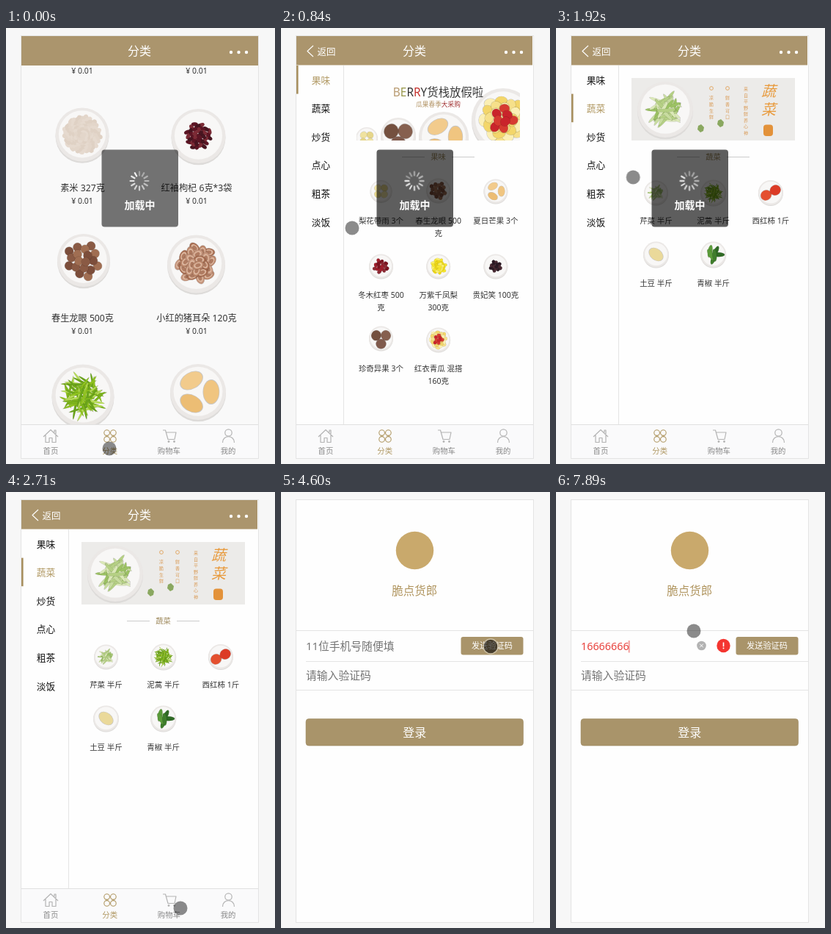
An HTML page for the animation above (8 s loop, 367 px wide and 593 px high).

```html
<!DOCTYPE html>
<html lang="zh-CN">
<head>
<meta charset="utf-8">
<title>分类</title>
<style>
html, body { margin: 0; width: 100%; height: 100%; overflow: hidden; background: #f7f7f7; }
svg { display: block; width: 367px; height: 593px; font-family: "Noto Sans", "Noto Sans CJK SC", "Noto Sans CJK", sans-serif; }
.run { animation: 8s step-end infinite; }
#home { animation-name: home; }
#shop { animation-name: shop; }
#fruit { animation-name: fruit; }
#veg { animation-name: veg; }
#login { animation-name: login; }
#loader { animation-name: loader; }
#hint { animation-name: hint; }
#warn { animation-name: warn; }
#caret { animation-name: caret; }
#ring { animation-name: ring; }
.type { animation-name: type; }
#cursor { animation-name: cursor; }
#spin { transform-origin: 182px 208px; animation: spin 1s steps(12) infinite; }
@keyframes home { 3.6%, to { opacity: 0; } }
@keyframes shop { from { opacity: 0; } 3.6% { opacity: 1; } 37.75%, to { opacity: 0; } }
@keyframes fruit { 21%, to { opacity: 0; } }
@keyframes veg { from { opacity: 0; } 21%, to { opacity: 1; } }
@keyframes login { from { opacity: 0; } 37.75%, to { opacity: 1; } }
@keyframes loader {
  from { opacity: .86; } 3.6% { opacity: 1; } 12.375% { opacity: .5; } 13.875% { opacity: 0; }
  21% { opacity: 1; } 25.75% { opacity: 0; }
  37.75% { opacity: 1; } 41.125% { opacity: .53; } 43.125%, to { opacity: 0; }
}
@keyframes hint { 78%, to { opacity: 0; } }
@keyframes warn { from { opacity: 0; } 78%, to { opacity: 1; } }
@keyframes caret { from { opacity: 0; } 71%, to { opacity: 1; } }
@keyframes ring { from { opacity: 0; } 57.5% { opacity: 1; } 59.3%, to { opacity: 0; } }
@keyframes type {
  from { transform: translateX(0); }
  78% { transform: translateX(8.2px); }
  83% { transform: translateX(16.4px); }
  87% { transform: translateX(24.6px); }
  89.125% { transform: translateX(32.8px); }
  93.25% { transform: translateX(41px); }
  95.25% { transform: translateX(49.2px); }
  97.125% { transform: translateX(57.4px); }
  98.625%, to { transform: translateX(65.6px); }
}
@keyframes cursor {
  from { transform: translate(141px, 572px); }
  1.875% { transform: translate(141px, 572px); animation-timing-function: steps(6, start); }
  12.225% { transform: translate(97px, 272px); }
  12.375% { transform: translate(97px, 272px); animation-timing-function: steps(5, start); }
  20.8125% { transform: translate(61px, 110px); }
  22.5% { transform: translate(61px, 110px); animation-timing-function: steps(4, start); }
  29% { transform: translate(238px, 482px); animation-timing-function: steps(4, start); }
  35.5% { transform: translate(238px, 566px); }
  43.125% { transform: translate(238px, 566px); animation-timing-function: steps(5, start); }
  52.125% { transform: translate(272px, 245px); animation-timing-function: steps(4, start); }
  59.3% { transform: translate(286px, 210px); animation-timing-function: steps(2, start); }
  63.125% { transform: translate(168px, 216px); }
  83% { transform: translate(168px, 216px); animation-timing-function: steps(7, start); }
  97.125% { transform: translate(168px, 191px); animation-timing-function: steps(2, start); }
  to { transform: translate(188px, 189px); }
}
@keyframes spin { to { transform: rotate(360deg); } }
</style>
</head>
<body>
<svg id="stage" viewBox="0 0 367 593"></svg>
<script>
const GOLD = '#ab956d', TAN = '#b09862', INK = '#333', RULE = '#e4e4e4';

const text = (x, y, size, fill, str, extra = '') =>
  `<text x="${x}" y="${y}" font-size="${size}" fill="${fill}" text-anchor="middle" ${extra}>${str}</text>`;
const rect = (x, y, w, h, fill, extra = '') =>
  `<rect x="${x}" y="${y}" width="${w}" height="${h}" fill="${fill}" ${extra}/>`;
const disc = (x, y, r, fill, extra = '') =>
  `<circle cx="${x}" cy="${y}" r="${r}" fill="${fill}" ${extra}/>`;
const path = (d, stroke, width = 1.2) =>
  `<path d="${d}" fill="none" stroke="${stroke}" stroke-width="${width}" stroke-linejoin="round"/>`;
const group = (id, body, extra = '') => `<g id="${id}" class="run" ${extra}>${body}</g>`;

// Colours, then count, half width, half height and spread relative to the plate radius.
// A last value, if present, is the start angle of a ring instead of a heap.
const FOODS = {
  rice: ['#e3d6ca #dfd1c4 #e6dacf', 120, .12, .09, .66],
  goji: ['#5c1524 #7c2a35 #471520', 34, .12, .07, .46],
  longan: ['#8a5a44 #a06e52 #7c4e3b', 18, .165, .165, .66],
  ears: ['#b98468 #c4937a #a66c50', 24, .21, .14, .6],
  shreds: ['#8fc31f #6aa51b #b6dc57 #7db51c', 60, .36, .035, .5],
  mango: ['#f0c580 #ecbd74 #f2cb8c', 3, .42, .28, .47, 0],
  pear: ['#efe2a0 #e6d68a', 4, .32, .29, .42, .8],
  jujube: ['#a01f2c #7c1420 #8c2a34', 15, .18, .14, .56],
  pineapple: ['#f6e52e #efd818 #fbf06a', 22, .22, .13, .56],
  berry: ['#2c1a24 #4a2a33', 15, .15, .14, .44],
  plum: ['#7f5a4c #74503f #86604f', 3, .42, .4, .46, 1.57],
  flesh: ['#f6e08a #fbefb4 #f3d66a', 26, .2, .16, .66],
  heart: ['#c9242b #d63a30', 8, .16, .14, .38],
  celery: ['#b5d084 #dbe8b8 #9cc264 #c8dca0', 30, .34, .06, .42],
  tomato: ['#dc3b26 #e4502f', 2, .4, .44, .42, -.5],
  potato: ['#ead99a', 1, .6, .42, 0, -.9],
  pepper: ['#3f7d2c #5b9b3a #2f6a24', 6, .48, .17, .42]
};

function heap(kind, x, y, r) {
  const [names, count, w, h, spread, ring] = FOODS[kind];
  const colors = names.split(' ');
  let seed = kind.length * 77 + count, out = '';
  const rnd = () => (seed = (seed * 16807) % 2147483647) / 2147483647;
  for (let i = count - 1; i >= 0; i--) {
    const ringed = ring !== undefined;
    const a = ringed ? ring + i * 2 * Math.PI / count : i * 2.4 + .6;
    const d = r * spread * (ringed ? 1 : Math.sqrt((i + .4) / count));
    const cx = (x + d * Math.cos(a)).toFixed(1), cy = (y + d * Math.sin(a)).toFixed(1);
    const turn = (ringed ? a * 180 / Math.PI + 90 : rnd() * 180).toFixed(0);
    const oval = (scale, fill) => `<ellipse cx="${cx}" cy="${cy}" rx="${(r * w * scale).toFixed(2)}" ` +
      `ry="${(r * h * scale).toFixed(2)}" fill="${fill}" transform="rotate(${turn} ${cx} ${cy})"/>`;
    if (kind !== 'rice') out += oval(1.07, '#0003');
    out += oval(1, colors[i % colors.length]);
    if (kind === 'ears') out += oval(.72, '#dcb69e') + oval(.45, '#b07c62');
  }
  return out;
}

function food(kinds, x, y, r) {
  return disc(x, y + r * .06, r, '#dddbd9') + disc(x, y, r, '#ebe8e6') + disc(x, y - r * .02, r * .88, '#f8f7f6') +
    kinds.split(' ').map(kind => heap(kind, x, y, r)).join('');
}

function header(width, height) {
  return rect(21, 11, width, height, GOLD) + text(182, 37, 16, '#fff', '分类') +
    [307, 317.5, 328].map(x => disc(x, 33, 2.2, '#fff')).join('');
}

function tabs() {
  const gray = '#b4b4b4';
  const petals = [-1, 1].map(a => [-1, 1].map(b =>
    disc(142 + a * 4.4, 555 + b * 4.4, 3.8, 'none', `stroke="${TAN}" stroke-width="1.1"`)).join('')).join('');
  return rect(21, 540, 323, 45, '#fafafb') + path('M21 539.5H344', '#e0e0e0', 1) +
    path('M51 556L61 546.5L71 556M54 554V563.5H59V557.5H63V563.5H68V554M66 550V547H68V552', gray) + petals +
    path('M214 547H217.5L221 559.5H230L232 550H218.5', gray) +
    disc(222, 562.5, 1.4, gray) + disc(229.5, 562.5, 1.4, gray) +
    disc(303.5, 550.5, 4.7, 'none', `stroke="${gray}" stroke-width="1.2"`) +
    path('M295.5 564C295.5 553 311.5 553 311.5 564', gray) +
    ['首页', '分类', '购物车', '我的'].map((s, i) =>
      text(61 + i * 80.7, 579, 10.4, i === 1 ? TAN : '#888', s)).join('');
}

function home() {
  const price = (x, y) => text(x, y, 10.5, INK, '¥ 0.01');
  const name = (x, y, s) => text(x, y, 12.2, INK, s);
  return rect(21, 11, 323, 574, '#f9f9f9') +
    [62, 239, 415.5].map(y => price(104, y) + price(260, y)).join('') +
    food('rice', 104, 145, 36.5) + food('goji', 262.5, 147, 37) +
    name(104.5, 221.5, '素米 327克') + name(260, 221.5, '红袖枸杞 6克*3袋') +
    food('longan', 106, 316, 36) + food('ears', 259.5, 321, 39.5) +
    name(104.5, 398.5, '春生龙眼 500克') + name(260, 398.5, '小红的猪耳朵 120克') +
    food('shreds', 105, 500, 42.5) + food('mango', 262, 495, 38) +
    header(323, 40) + tabs();
}

const column = i => 136.5 + i * 78.2;

function sidebar(active) {
  return rect(21, 51 + active * 38.6, 2.6, 38.6, '#a89060') +
    ['果味', '蔬菜', '炒货', '点心', '粗茶', '淡饭'].map((s, i) =>
      text(54.5, 75.5 + i * 38.6, 12.7, i === active ? TAN : '#111', s)).join('');
}

function section(name) {
  return path('M165 175.5H196M233 175.5H264', '#ccc', 1) + text(214.5, 179, 10.3, '#a08c60', name);
}

function item(kinds, col, y, labelY, lines, r = 16.5) {
  return food(kinds, column(col), y, r) +
    lines.split('|').map((s, i) => text(column(col), labelY + i * 16.5, 10.5, INK, s)).join('');
}

function fruit() {
  const tint = (s, c) => `<tspan fill="${c}">${s}</tspan>`;
  const title = tint('B', '#b89a70') + tint('E', '#98974a') + tint('R', INK) +
    tint('R', '#c4302c') + tint('Y货栈放假啦', '#3a3a3a');
  return sidebar(0) +
    `<g clip-path="url(#banner)">` + food('pear', 117, 150, 15) + food('plum', 160, 146, 24) +
    food('mango', 222, 148, 34) + food('flesh heart', 303, 125, 43) + '</g>' +
    text(214.5, 93, 15.4, INK, title, 'font-weight="500"') +
    text(214.5, 106.5, 8.7, INK, tint('瓜果春季', '#b09060') + tint('大采购', '#a03030'), 'font-weight="500"') +
    section('果味') +
    item('pear', 0, 222, 266, '梨花带雨 3个', 15) +
    item('longan', 1, 221, 266, '春生龙眼 500|克') +
    item('mango', 2, 222, 266, '夏日芒果 3个') +
    item('jujube', 0, 324, 367, '冬木红枣 500|克') +
    item('pineapple', 1, 324, 367, '万紫千凤梨|300克') +
    item('berry', 2, 324, 367, '贵妃笑 100克') +
    item('plum', 0, 422, 467, '珍奇异果 3个') +
    item('flesh heart', 1, 424, 467, '红衣青瓜 混搭|160克');
}

function veg() {
  const down = (x, y, gap, size, s) =>
    [...s].map((c, i) => text(x, y + i * gap, size, '#d99a55', c)).join('');
  const leaf = (x, y) => `<path d="M${x} ${y - 5}l4 4l-1 5l-4 2l-4-4l1-5z" fill="#8aa860"/>`;
  const dot = x => disc(x, 82, 2.4, 'none', 'stroke="#e0a35c" stroke-width=".9"');
  return sidebar(1) + rect(103, 68, 223, 85, '#ecebe9') + food('celery', 149, 111, 38) +
    leaf(198, 136) + leaf(225, 129) + dot(212) + dot(234) +
    down(212, 97, 8.8, 6, '凉脆生鲜') + down(234, 97, 8.8, 6, '鲜香可口') +
    down(259, 85, 8.5, 6, '来自平野鲜养心神') +
    text(290, 93, 20, '#e89a3c', '蔬', 'font-style="italic"') +
    text(290, 118, 20, '#e89a3c', '菜', 'font-style="italic"') +
    rect(283, 131.5, 13, 15.5, '#e3923a', 'rx="4"') +
    section('蔬菜') +
    item('celery', 0, 224, 266, '芹菜 半斤') +
    item('shreds', 1, 224, 266, '泥蒿 半斤', 17.5) +
    item('tomato', 2, 224, 266, '西红柿 1斤', 17) +
    item('potato', 0, 308, 351, '土豆 半斤', 17.5) +
    item('pepper', 1, 308, 351, '青椒 半斤', 17.5);
}

function shop() {
  return rect(21, 11, 323, 574, '#fefefe') + path('M85.5 51V539', RULE, 1) +
    group('fruit', fruit()) + group('veg', veg()) + header(322, 39.5) +
    path('M44 24L36 31.5L44 39', '#fff', 1.1) + text(62, 36.5, 12.5, '#fff', '返回', 'font-weight="500"') + tabs();
}

function login() {
  const left = 'style="text-anchor:start"', red = '#e8413c';
  return rect(21, 11, 323, 574, '#fefefe') + disc(182.5, 79.5, 25.7, '#c9a96c') +
    text(182.3, 140, 15.5, '#b0955f', '脆点货郎') +
    path('M21 188.5H344M34 230.5H344M21 269.5H344', RULE, 1) +
    group('hint', text(34, 215, 14.8, '#757575', '11位手机号随便填', left)) +
    text(34, 255, 14.8, '#757575', '请输入验证码', left) +
    `<g clip-path="url(#typed)">${text(34, 215, 14.35, red, '16666666', left)}</g>` +
    group('caret', `<g class="run type">${rect(33.6, 202, 1, 16.5, red)}</g>`) +
    group('warn', disc(198.5, 209, 6.3, '#b2b2b2') +
      path('M196.2 206.7L200.8 211.3M200.8 206.7L196.2 211.3', '#fff', 1) +
      disc(228.5, 209, 9.2, '#f43530') + rect(227.7, 204.5, 1.6, 5.8, '#fff') + disc(228.5, 212.6, 1, '#fff')) +
    rect(245.5, 197, 85, 24.5, '#a9946a', 'rx="3"') +
    text(288, 213.2, 11.2, '#fff', '发送验证码', 'font-weight="500"') +
    rect(34, 308.5, 296.5, 36.5, '#a9946a', 'rx="4" stroke="#9a865e" stroke-width=".6"') +
    text(182.3, 332.5, 16, '#fff', '登录');
}

function loader() {
  let spokes = '';
  for (let i = 0; i < 12; i++) {
    spokes += rect(180.9, 194.5, 2.2, 7, '#fff',
      `rx="1" opacity="${(.35 + i * .05).toFixed(2)}" transform="rotate(${i * 30} 182 208)"`);
  }
  return rect(130.5, 165.5, 104.5, 105, '#000', 'rx="4" opacity=".63"') +
    `<g id="spin">${spokes}</g>` + text(182.5, 246, 14, '#fff', '加载中', 'font-weight="700"');
}

document.getElementById('stage').innerHTML =
  `<defs>
    <clipPath id="phone">${rect(21, 11, 323, 574, '#fff')}</clipPath>
    <clipPath id="banner">${rect(103, 68, 223, 85, '#fff')}</clipPath>
    <clipPath id="typed">${rect(-66, 195, 100, 30, '#fff', 'class="run type"')}</clipPath>
  </defs>` +
  rect(20.5, 10.5, 324, 575, '#fefefe', `stroke="${RULE}"`) +
  `<g clip-path="url(#phone)">` +
  group('home', home()) + group('shop', shop()) + group('login', login()) + '</g>' +
  group('loader', loader()) +
  group('cursor', disc(0, 0, 9.5, '#000', 'opacity=".45"') +
    group('ring', disc(0, 0, 10, '#000', 'fill-opacity=".25" stroke="#d8cdb4" stroke-opacity=".8" stroke-width="1.4"')));
</script>
</body>
</html>
```
